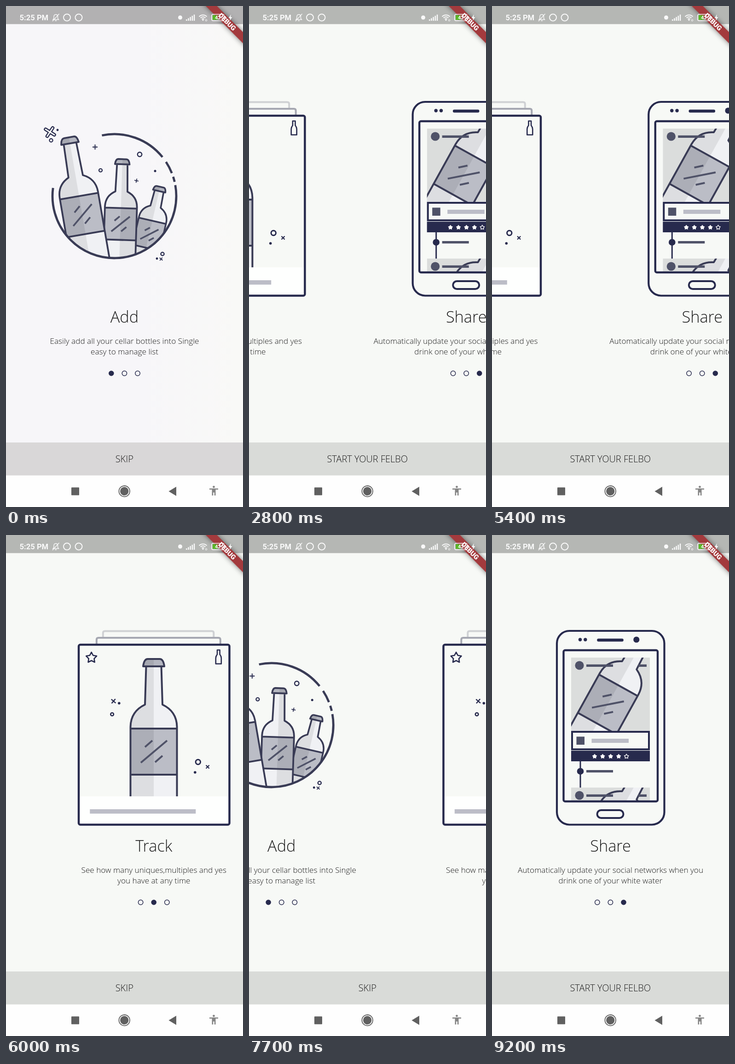
Write an HTML page that moves like this. It is 515x1087 px and loops after 9300 ms.

```html
<!DOCTYPE html>
<html lang="en">
<head>
<meta charset="utf-8">
<title>Onboarding</title>
<style>
html, body { margin: 0; width: 100%; height: 100%; overflow: hidden; background: #f7f9f6; }
svg { display: block; }
#stage { width: 100vw; height: 100vh; }
.txt { font-family: "Open Sans", sans-serif; font-weight: 300; text-anchor: middle; fill: #1c1c1c; }
.ui { font-family: Roboto, sans-serif; fill: #fff; }
.ribbon { filter: drop-shadow(0 0 4px rgba(0, 0, 0, .5)); }
</style>
</head>
<body>
<svg id="stage" viewBox="0 0 515 1087" preserveAspectRatio="none"></svg>
<script>
const W = 515, LOOP = 9300, STEP = 100, DP = W / 360;
const NAVY = '#272a4d', INK = '#393b55', SLATE = '#4f5268', PALE = '#bcbdc7', BG = '#f7f9f6';
const stage = document.getElementById('stage');

// Each swipe: start in seconds, stiffness, direction
const SWIPES = [
  [1.25, 14.6, 1], [2.66, 14, 1],
  [5.27, 10.3, -1], [5.95, 12.4, -1],
  [7.6, 12.7, 1], [8.0, 15, 1]
];

const line = (d, w, c = NAVY, extra = '') =>
  `<path d="${d}" fill="none" stroke="${c}" stroke-width="${w}" ${extra}/>`;
const fill = (d, c) => `<path d="${d}" fill="${c}"/>`;
const dot = (x, y, r, c = NAVY) => `<circle cx="${x}" cy="${y}" r="${r}" fill="${c}"/>`;
const ring = (x, y, r, w, c = NAVY) =>
  `<circle cx="${x}" cy="${y}" r="${r}" fill="none" stroke="${c}" stroke-width="${w}"/>`;
const box = (x, y, w, h, c) => `<rect x="${x}" y="${y}" width="${w}" height="${h}" fill="${c}"/>`;
const frame = (x, y, w, h, r, sw, f = 'none') =>
  `<rect x="${x}" y="${y}" width="${w}" height="${h}" rx="${r}" fill="${f}" stroke="${NAVY}" stroke-width="${sw}"/>`;
const text = (x, y, dp, s, id = '') =>
  `<text class="txt" id="${id}" x="${x}" y="${y}" font-size="${(dp * DP).toFixed(2)}">${s}</text>`;
const cross = (x, y, r, deg, w = 2) =>
  line(`M${-r} 0H${r}M0 ${-r}V${r}`, w, NAVY, `transform="translate(${x} ${y}) rotate(${deg})"`);

function star(x, y, r, inner) {
  const pts = [];
  for (let i = 0; i < 10; i++) {
    const a = (i / 5 - .5) * Math.PI, q = i % 2 ? r * inner : r;
    pts.push((x + q * Math.cos(a)).toFixed(2) + ' ' + (y + q * Math.sin(a)).toFixed(2));
  }
  return 'M' + pts.join('L') + 'Z';
}

function arc(cx, cy, r, a, b) {
  const at = d => {
    const t = d * Math.PI / 180;
    return (cx + r * Math.cos(t)).toFixed(2) + ' ' + (cy + r * Math.sin(t)).toFixed(2);
  };
  return `M${at(a)}A${r} ${r} 0 ${b - a > 180 ? 1 : 0} 1 ${at(b)}`;
}

// Local origin is the middle of the label's top edge; the body is 101 wide
let clips = 0;
function bottle(x, y, s, deg, { neck = 83, shade = -60, width = 4 } = {}) {
  const id = 'b' + clips++, top = -52 - neck;
  const body = `M-50.5 190V-4C-50 -28 -38 -43 -19 -52L-16.5 ${top}H16.5L19 -52C38 -43 50 -28 50.5 -4V190Z`;
  const cap = `M-23 ${top}Q-21 ${top - 16} -13 ${top - 16}H13Q21 ${top - 16} 23 ${top}Z`;
  const w = width / s;
  return `<g transform="translate(${x} ${y}) rotate(${deg}) scale(${s})" stroke-linejoin="round">
    <clipPath id="${id}"><path d="${body}${cap}"/></clipPath>
    ${fill(body, '#f0f1f4')}${fill(cap, '#b4b6c0')}${box(-50.5, 0, 101, 100, '#bbbdc6')}
    <g clip-path="url(#${id})">${box(shade, -170, 60, 370, 'rgba(0,0,0,.08)')}</g>
    ${line(body + cap + 'M-50.5 0H50.5M-50.5 100H50.5', w, INK)}
    ${line('M-28 74L29 26M-19 40L-3 26M3 73L19 59', w, SLATE)}
  </g>`;
}

function pager(n) {
  return [0, 1, 2].map(i => i === n ? dot(228.8 + i * 28.6, 797, 5.8)
    : ring(228.8 + i * 28.6, 797, 5.2, 1.5)).join('');
}

function page(n, title, a, b, art) {
  return `<g transform="translate(${n * W} 0)">${art}${text(257.5, 687, 24, title)}
    ${text(257.5, 733, 12, a)}${text(257.5, 756, 12, b)}${pager(n)}</g>`;
}

function addArt() {
  const gaps = [[-101.6, -39], [-33.5, -21.8], [-18.2, -13.3], [-10.2, 187.6]];
  const spark = 'M86 267.5L105 279.5M101.5 264.5L89.5 282.5';
  return `<clipPath id="bowl"><path d="M0 0H515V412.5H370A134.5 134.5 0 0 1 101 412.5H0Z"/></clipPath>
    <g clip-path="url(#bowl)">
      ${bottle(318, 466, .6, 13, { neck: 58, width: 3.6 })}
      ${bottle(249.7, 438.5, .69, 1.8, { neck: 86, shade: 0, width: 3.8 })}
      ${bottle(158.8, 412.5, .835, -9.8, { neck: 87, width: 3.8 })}
    </g>
    ${line(gaps.map(g => arc(235.5, 412.5, 134.5, g[0], g[1])).join(''), 4.8, INK)}
    ${line(spark, 7.5, NAVY, 'stroke-linecap="round"')}${line(spark, 3, BG, 'stroke-linecap="round"')}
    ${dot(112, 269, 2.4)}${ring(98, 291.5, 3.6, 2.2)}
    ${cross(193.5, 306, 5.5, 0)}${ring(290.5, 322, 4.7, 2.4)}${ring(205.5, 356.5, 3.5, 2.2)}
    ${dot(324, 358, 2.5)}${cross(283.5, 379, 4.5, 12, 1.8)}
    ${ring(340, 538, 3.6, 2.3)}${dot(328, 548, 2.4)}${cross(337, 549, 4.3, 40, 1.8)}`;
}

function trackArt() {
  const tab = (l, r, y, bottom, c) =>
    line(`M${l} ${bottom}V${y + 4}Q${l} ${y} ${l + 4} ${y}H${r - 4}Q${r} ${y} ${r} ${y + 4}V${bottom}`, 4, c);
  return `<g transform="translate(-5.5 0)">
    ${tab(152.5, 393, 208.5, 221, '#cfd1d4')}${tab(138.5, 407.5, 223, 236, '#a5a7b1')}
    ${bottle(262.7, 420, 1, 0)}
    ${box(101, 567, 325, 60, '#fefffe')}${box(124, 595, 230, 9.5, PALE)}
    ${frame(99.7, 238, 327.5, 390.5, 3.5, 4.5)}
    ${line(star(127.3, 266.3, 12, .52), 2.6, NAVY, 'stroke-linejoin="round"')}
    ${line('M400.7 249.5H406.3V259Q409.5 263 409.5 267V279.5H397.5V267Q397.5 263 400.7 259Z', 2.6, NAVY, 'stroke-linejoin="round"')}
    ${cross(175.3, 360.5, 6.3, 40, 2.4)}${dot(187.5, 365, 2.8)}${ring(172.3, 389, 3.3, 2.6)}
    ${ring(359, 492.5, 5.2, 3)}${cross(379.8, 503, 5, 45, 2.3)}${dot(352.5, 515, 2.8)}
  </g>`;
}

function post(y, h) {
  return `<svg x="172" y="${y}" width="171" height="${h}" viewBox="172 266 171 ${h}">
    ${box(172, 266, 171, 160, '#dbdddc')}${bottle(274.5, 326, .95, 29)}
    ${dot(190, 283, 9.6, SLATE)}${line('M205 283.3H263M318 283.3H336', 5.2, SLATE)}</svg>`;
}

function shareArt() {
  const stars = [0, 1, 2, 3].map(i => star(223 + i * 17.4, 480.4, 5.6, .62)).join('');
  return `${frame(141, 208, 233.5, 420.5, 27, 4.2)}
    ${dot(191.5, 227, 3.7)}${dot(202.8, 227, 3.7)}${dot(313.8, 227, 6.6)}
    ${line('M231.5 228H282.5', 6.6, NAVY, 'stroke-linecap="round"')}
    ${post(266, 159)}${post(548, 29)}
    ${frame(174, 427, 167, 38, 0, 4, BG)}
    ${box(183.5, 437.5, 17.5, 17.5, SLATE)}${box(216.5, 442, 80.5, 9, PALE)}
    ${box(172, 468, 171, 23, NAVY)}${fill(stars, '#fff')}
    ${line(star(292.2, 480.4, 4.8, .6), 1.4, '#fff')}
    ${line('M192 491V548', 3)}${dot(192, 512.7, 7.3)}${line('M205 512.7H263', 5.2, SLATE)}
    ${frame(155.5, 250, 204.5, 328, 3.5, 4.4)}
    ${frame(228.5, 597, 57, 17, 8.5, 4)}`;
}

function statusBar() {
  const bars = [0, 1, 2, 3, 4].map(i => box(391 + i * 4.2, 29 - i * 2.6, 2.5, 3 + i * 2.6, '#fff')).join('');
  return `<g opacity=".93"><text class="ui" x="29.5" y="31" font-size="16.6" font-weight="600">5:25 PM</text>
    ${line('M102 29.5H114.5L112.5 27V22.5Q112 18.5 108.3 18.5Q104.5 18.5 104 22.5V27ZM106.5 32H110M101 33L115.5 17', 1.4, '#fff')}
    ${ring(132.5, 25, 7.5, 2, '#fff')}${ring(158, 25, 7.5, 2, '#fff')}
    ${dot(378.5, 25, 4.5, '#fff')}${bars}
    ${[3.5, 7.5, 11.5].map(r => line(arc(428, 31, r, -137, -43), 2, '#fff')).join('')}
    ${dot(428, 30.5, 1.6, '#fff')}${ring(435, 31, 1.8, 1, '#fff')}
    <rect x="447" y="18" width="27" height="14" rx="3" fill="none" stroke="#fff" stroke-width="1.6"/>
    ${box(449, 20, 11, 10, '#55b81f')}${box(475.5, 22, 2, 6, '#fff')}
    <text class="ui" x="454" y="29.3" font-size="11.5" font-weight="700">42</text>
    ${fill('M489 18L483.5 26.5H487L485.5 33L491.5 24H488Z', '#fff')}</g>`;
}

function navBar() {
  const grey = '#606060';
  return box(0, 1018.5, W, 69, '#fefefe') + `<rect x="142" y="1044.5" width="17" height="17" rx="1" fill="${grey}"/>`
    + ring(257.2, 1052.8, 11.8, 1.8, grey) + dot(257.2, 1052.8, 9.2, grey)
    + fill('M353.5 1053L370 1043V1063Z', grey)
    + dot(451.5, 1043.3, 2.4, '#858585')
    + fill('M442 1046.8H461V1049.2H455.5V1062H452.8V1055.5H450.2V1062H447.5V1049.2H442Z', '#858585');
}

// Corner ribbon, laid out in density-independent units
function ribbon() {
  return `<g transform="translate(515 0) rotate(45) scale(${DP})">
    <rect class="ribbon" x="-48" y="28" width="96" height="12" fill="#a33a3d"/>
    <text class="ui" x="0" y="37.6" font-size="10.2" font-weight="900" text-anchor="middle">DEBUG</text></g>`;
}

stage.innerHTML = `
  <linearGradient id="tint"><stop offset=".55" stop-color="#f7f6f9"/><stop offset="1" stop-color="#f9f9f7"/></linearGradient>
  <rect id="back" width="515" height="1087"/>
  <g id="pages">
    ${page(0, 'Add', 'Easily add all your cellar bottles into Single', 'easy to manage list', addArt())}
    ${page(1, 'Track', 'See how many uniques,multiples and yes', 'you have at any time', trackArt())}
    ${page(2, 'Share', 'Automatically update your social networks when you', 'drink one of your white water', shareArt())}
  </g>
  <rect id="top" width="515" height="39.3"/>
  <rect id="foot" y="947" width="515" height="72"/>
  ${text(257.3, 990.3, 14, '', 'label')}
  ${navBar()}${ribbon()}${statusBar()}`;

const [back, pages, topBar, foot, label] =
  ['back', 'pages', 'top', 'foot', 'label'].map(id => document.getElementById(id));

function scrollAt(sec) {
  let p = 0;
  for (const [start, k, dir] of SWIPES) {
    const x = Math.max(0, sec - start) * k;
    p += dir * (1 - (1 + x) * Math.exp(-x));
  }
  return p;
}

function draw(ms) {
  const t = Math.floor(ms / STEP) * STEP, p = scrollAt(t / 1000), lilac = t < 1300;
  pages.setAttribute('transform', `translate(${(-p * W).toFixed(2)} 0)`);
  label.textContent = p > 1.5 ? 'START YOUR FELBO' : 'SKIP';
  back.setAttribute('fill', lilac ? 'url(#tint)' : BG);
  topBar.setAttribute('fill', lilac ? '#b2b1b2' : '#b5b7b4');
  foot.setAttribute('fill', lilac ? '#d9d7d8' : '#d9dbd8');
}

const began = performance.now();
function tick() {
  draw((performance.now() - began) % LOOP);
  requestAnimationFrame(tick);
}
tick();
</script>
</body>
</html>
```
